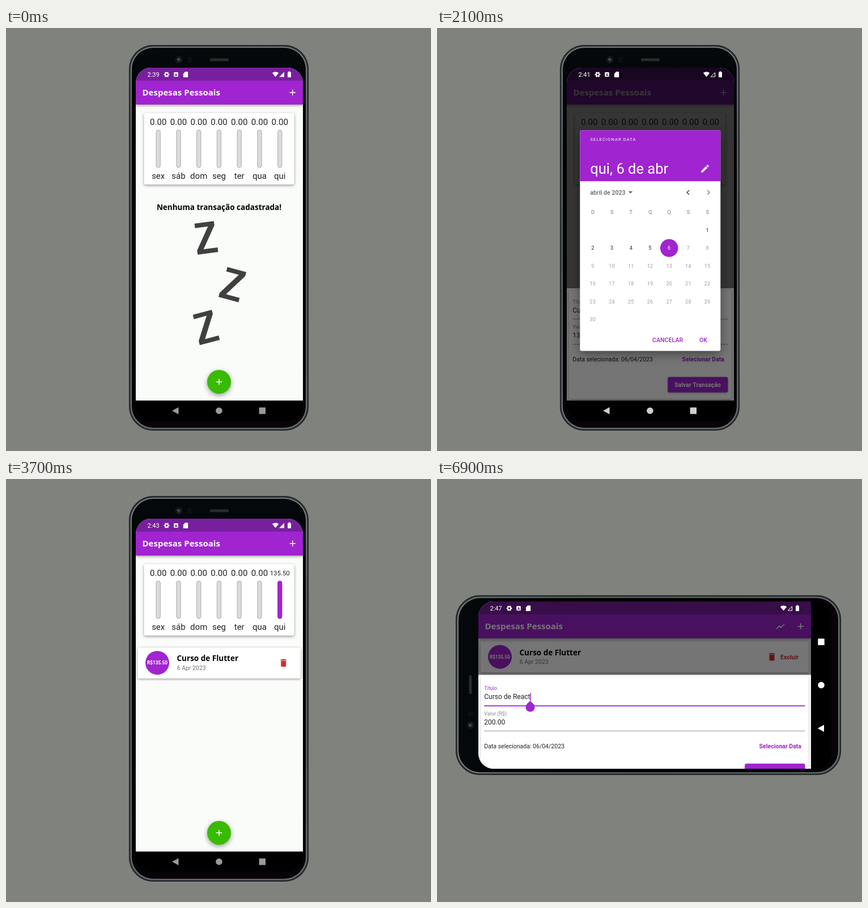
Write an HTML page with a canvas that moves like this. It is 750 by 746 pixels and loops after 8 s.

```html
<!DOCTYPE html>
<html lang="pt">
<head>
<meta charset="utf-8">
<title>Despesas Pessoais</title>
<style>
html, body { margin: 0; width: 100%; height: 100%; overflow: hidden; background: #80827e; }
canvas { display: block; }
</style>
</head>
<body>
<canvas id="stage" width="750" height="746"></canvas>
<script>
const ctx = document.getElementById('stage').getContext('2d');
const LOOP = 8000;
const PURPLE = '#a024d0', WHITE = '#fff', INK = '#222', GREY = '#757575', RED = '#d32f2f';
const roboto = (size, weight = 400) => `${weight} ${size}px Roboto, sans-serif`;
const openSans = size => `700 ${size}px "Open Sans", sans-serif`;
const inter = size => `400 ${size}px Inter, sans-serif`;

const ICONS = {
  add: 'M19 13h-6v6h-2v-6H5v-2h6V5h2v6h6v2z',
  edit: 'M3 17.25V21h3.75L17.81 9.94l-3.75-3.75zM20.71 7.04c.39-.39.39-1.02 0-1.41l-2.34-2.34c-.39-.39-1.02-.39-1.41 0l-1.83 1.83 3.75 3.75z',
  trash: 'M6 19c0 1.1.9 2 2 2h8c1.1 0 2-.9 2-2V7H6zM19 4h-3.5l-1-1h-5l-1 1H5v2h14z',
  chart: 'M3.5 18.49l6-6.01 4 4L22 6.92l-1.41-1.41-7.09 7.97-4-4L2 16.99z',
  prev: 'M15.41 7.41L14 6l-6 6 6 6 1.41-1.41L10.83 12z',
  next: 'M10 6L8.59 7.41 13.17 12l-4.58 4.59L10 18l6-6z',
  drop: 'M7 10l5 5 5-5z',
  check: 'M9 16.17L4.83 12l-1.42 1.41L9 19 21 7l-1.41-1.41z',
  wifi: 'M12 21L0 6Q12-2 24 6z',
  card: 'M3 9L10 1H19Q21 1 21 3V21Q21 23 19 23H5Q3 23 3 21z',
  z: 'M-17-27.5H17.5V-20L-7 19.5H18V27.5H-18.5V20L6-19.5H-17z'
};
for (const name in ICONS) ICONS[name] = new Path2D(ICONS[name]);

// Each slide holds until the next one starts.
const SLIDES = [
  { at: 0, clock: '2:39', signal: true },
  { at: 500, clock: '2:40', signal: true, over: keyboardForm, nav: '#85858a', keys: true },
  { at: 2100, clock: '2:41', over: datePicker, nav: '#cfcfcf' },
  { at: 3700, clock: '2:43', signal: true, paid: true },
  { at: 5300, clock: '2:44', wide: true, paid: true },
  { at: 6900, clock: '2:47', wide: true, paid: true, over: wideForm, nav: WHITE }
];

function text(str, x, y, font, color, align = 'left', spacing = 0) {
  ctx.font = font;
  ctx.fillStyle = color;
  ctx.textAlign = align;
  ctx.letterSpacing = spacing + 'px';
  ctx.fillText(str, x, y);
}

function box(x, y, w, h, color, r = 0, shadow = 0) {
  ctx.save();
  if (shadow) {
    ctx.shadowColor = 'rgba(0,0,0,.4)';
    ctx.shadowBlur = shadow;
    ctx.shadowOffsetY = shadow / 3;
  }
  ctx.fillStyle = color;
  ctx.beginPath();
  ctx.roundRect(x, y, w, h, r);
  ctx.fill();
  ctx.restore();
}

function frame(x, y, w, h, r, color, width) {
  ctx.strokeStyle = color;
  ctx.lineWidth = width;
  ctx.beginPath();
  ctx.roundRect(x, y, w, h, r);
  ctx.stroke();
}

const disc = (x, y, r, color, shadow) => box(x - r, y - r, 2 * r, 2 * r, color, r, shadow);

function path(points, color, width) {
  ctx.beginPath();
  points.forEach(([x, y]) => ctx.lineTo(x, y));
  if (width) {
    ctx.strokeStyle = color;
    ctx.lineWidth = width;
    ctx.stroke();
  } else {
    ctx.fillStyle = color;
    ctx.fill();
  }
}

function icon(name, x, y, color, size = 18) {
  ctx.save();
  ctx.translate(x - size / 2, y - size / 2);
  ctx.scale(size / 24, size / 24);
  ctx.fillStyle = color;
  ctx.fill(ICONS[name]);
  ctx.restore();
}

function fade(...colors) {
  const gradient = ctx.createLinearGradient(0, 30, 0, 710);
  colors.forEach((color, i) => gradient.addColorStop(i / (colors.length - 1), color));
  return gradient;
}

function phone(wide) {
  ctx.save();
  if (wide) {
    ctx.translate(3, 739);
    ctx.rotate(-Math.PI / 2);
  }
  box(217, 30, 317, 680, '#3a3f42', 43);
  frame(217.6, 30.6, 315.8, 678.8, 42.5, '#16191b', 1.2);
  frame(221, 34, 309, 672, 39, fade('#a0a5a7', '#777c7f', '#6c7174', '#777c7f', '#8a8f92'), 1.2);
  box(222, 35, 307, 670, fade('#05090c', '#000', '#000', '#080408'), 38);
  disc(305, 56, 6.5, '#15181b');
  disc(305, 56, 3, '#33373e');
  disc(304, 55, 1, '#777b82');
  box(320, 51, 8, 10, '#0c0f12', 2);
  box(360, 53.5, 33, 5, '#2a2a2a', 1.5);
  ctx.restore();
}

function statusBar(w, { clock, signal }) {
  text(clock, 20.5, 16, roboto(11), WHITE);
  ctx.strokeStyle = WHITE;
  ctx.lineWidth = 2;
  ctx.beginPath();
  ctx.arc(54.5, 12, 2.8, 0, 7);
  ctx.stroke();
  for (let i = 0; i < 6; i++) {
    const a = i * Math.PI / 3, c = Math.cos(a), s = Math.sin(a);
    path([[54.5 + 3 * c, 12 + 3 * s], [54.5 + 4.9 * c, 12 + 4.9 * s]], WHITE, 2.2);
  }
  box(67.2, 8, 7.6, 8, WHITE, 1);
  text('A', 71, 14.6, roboto(7, 700), '#51156c', 'center');
  icon('card', 88, 12, WHITE, 11);
  icon('wifi', w - 48.5, 12, WHITE, 11.5);
  const bars = [[w - 42, 16.5], [w - 33, 16.5], [w - 33, 7.5]];
  if (signal) path(bars, WHITE);
  else path([[w - 40.8, 16], [w - 33.5, 16], [w - 33.5, 8.7], [w - 40.8, 16]], WHITE, 1);
  box(w - 27, 7.7, 6, 9.3, WHITE, 1);
  box(w - 25.5, 6.5, 3, 2, WHITE);
}

function appBar(w, wide) {
  box(0, 22, w, 43, PURPLE, 0, 5);
  box(0, 0, w, 22.7, '#781f9e');
  text('Despesas Pessoais', 11.5, 49.3, openSans(15.02), WHITE);
  icon('add', w - 18.3, 43.8, WHITE);
  if (wide) icon('chart', w - 54, 44, WHITE);
}

function weekChart(paid) {
  box(14.5, 80, 265, 126, WHITE, 3, 5);
  ['sex', 'sáb', 'dom', 'seg', 'ter', 'qua', 'qui'].forEach((day, i) => {
    const x = 39.7 + 35.75 * i, full = paid && i === 6;
    if (full) text('135.50', x, 99.5, roboto(11.4), INK, 'center');
    else text('0.00', x, 101, roboto(15), INK, 'center');
    box(x - 4, 109.5, 8, 67, full ? PURPLE : '#dcdcdc', 4);
    frame(x - 3.6, 110, 7.2, 66, 3.6, full ? PURPLE : '#a0a0a0', .8);
    text(day, x, 196, roboto(15), INK, 'center');
  });
}

function emptyList() {
  text('Nenhuma transação cadastrada!', 147, 250.5, openSans(13.52), '#000', 'center');
  for (const [x, y, deg] of [[124, 300, -7.5], [171, 382.5, 15], [124, 458, -14.5]]) {
    ctx.save();
    ctx.translate(x, y);
    ctx.rotate(deg * Math.PI / 180);
    ctx.fillStyle = '#404040';
    ctx.fill(ICONS.z);
    ctx.restore();
  }
}

function expense(w, y, wide) {
  box(3.5, y, w - 7.5, 54.5, WHITE, 3, 4);
  disc(38, y + 27, 21, PURPLE);
  text('R$135.50', 38, y + 30, roboto(8.2, 700), WHITE, 'center');
  text('Curso de Flutter', 72.5, y + 24, openSans(13.52), '#000');
  text('6 Apr 2023', 72.7, y + 39.5, roboto(10.5), GREY);
  icon('trash', w - (wide ? 69 : 34.3), y + 27, RED);
  if (wide) text('Excluir', w - 22, y + 30.8, roboto(10.5, 700), RED, 'right');
}

function field(w, y, label, value, active) {
  text(label, 10.3, y, roboto(9), active ? PURPLE : '#888');
  text(value, 10.3, y + 16, roboto(12), INK);
  box(10.3, y + 27.3, w - 21, active ? 1.6 : 1.2, active ? PURPLE : '#aaa');
}

function form(w, y, title, value, active) {
  box(0, y, w, 200, WHITE);
  box(3.5, y + 3.5, w - 7.5, 192, WHITE, 3, 3);
  field(w, y + 26.5, 'Título', title, active === 0);
  field(w, y + 71, 'Valor (R$)', value, active === 1);
  text('Data selecionada: 06/04/2023', 10.3, y + 129.3, roboto(10.5), INK);
  text('Selecionar Data', w - 17, y + 129.3, roboto(10.5, 700), PURPLE, 'right');
  box(w - 116.7, y + 156.5, 106, 27, PURPLE, 3, 3);
  text('Salvar Transação', w - 64, y + 173.7, roboto(10.5, 700), WHITE, 'center');
}

const dim = (w, h) => box(0, 0, w, h, 'rgba(0,0,0,.54)');

function keyboardForm(w, h) {
  dim(w, h);
  form(w, 256.6, 'Curso de Flutter', '135,50', 1);
  box(46.5, 333, 1.5, 14, PURPLE);
  box(0, 431.5, w, 192, '#f1eef4');
  const tints = ['#e0deff', '#e0deff', '#f5d9fd', '#a9c7f8'];
  ['123', '456', '789', ',0.'].forEach((row, r) => {
    const y = 438 + 37.35 * r;
    for (let c = 0; c < 4; c++) {
      const x = 3 + 73 * c;
      box(x, y, 69.5, 33, c < 3 ? WHITE : tints[r], 16.5);
      if (c < 3) text(row[c], x + 34.7, y + 25.3, inter(22), INK, 'center');
    }
  });
  path([[252, 457], [262, 457]], INK, 1.5);
  path([[249, 490], [249, 493.5], [264.5, 493.5], [264.5, 490]], INK, 1.5);
  path([[248, 529.5], [252.5, 523], [265, 523], [265, 536], [252.5, 536], [248, 529.5], [252.5, 523]], INK, 1.5);
  path([[255, 526.5], [261, 532.5]], INK, 1.5);
  path([[261, 526.5], [255, 532.5]], INK, 1.5);
  icon('check', 257, 566.5, INK, 17);
}

function datePicker(w, h) {
  dim(w, h);
  form(w, 389, 'Curso de Flutter', '135,50');
  dim(w, h);
  box(23.3, 110.2, 248, 389.4, WHITE, 3, 18);
  box(23.3, 110.2, 248, 90.1, PURPLE, [3, 3, 0, 0]);
  text('SELECIONAR DATA', 41.4, 128.8, roboto(7.5), WHITE, 'left', 1.13);
  text('qui, 6 de abr', 41.3, 187, roboto(25.5), WHITE);
  icon('edit', 244, 178, WHITE);
  text('abril de 2023', 41.2, 223.8, roboto(10.5, 500), '#616161', 'left', .08);
  icon('drop', 112.5, 219.5, '#616161');
  icon('prev', 214, 220, '#444');
  icon('next', 250, 220, '#888');
  const col = i => 45.9 + 33.7 * i;
  [...'DSTQQSS'].forEach((d, i) => text(d, col(i), 258.2, roboto(9), GREY, 'center'));
  for (let day = 1; day <= 30; day++) {
    const x = col((day + 5) % 7), y = 286.5 + 31.55 * Math.floor((day + 5) / 7);
    if (day === 6) disc(x, y, 15.8, PURPLE);
    text(day, x, y + 3.2, roboto(9), day < 6 ? INK : day === 6 ? WHITE : '#9e9e9e', 'center', .25);
  }
  text('CANCELAR', 151, 483.7, roboto(10.5, 500), PURPLE, 'left', .1);
  text('OK', 234, 483.7, roboto(10.5, 500), PURPLE, 'left', .1);
}

function wideForm(w, h) {
  dim(w, h);
  form(w, 129.5, 'Curso de React', '200.00', 0);
  box(91.3, 161, 1.5, 14, PURPLE);
  disc(91.5, 186.5, 8, PURPLE);
  path([[91.5, 175], [85.8, 181], [97.2, 181]], PURPLE);
}

function navBar(wide, color, keys) {
  const [back, home, recent] = [0, 1, 2].map(i => wide ? [605, 223.7 - 76.2 * i] : [70.5 + 76.4 * i, 605]);
  const [x, y] = back;
  if (keys) path([[x - 5.7, y - 6], [x + 6.7, y - 6], [x + .5, y + 5]], color);
  else path([[x - 6.3, y], [x + 5, y - 6.3], [x + 5, y + 6.3]], color);
  disc(...home, 5.8, color);
  box(recent[0] - 5.7, recent[1] - 5.7, 11.4, 11.4, color, .5);
  if (!keys) return;
  for (let i = 0; i < 10; i++) box(255.5 + i % 5 * 2.5, 601.5 + (i > 4) * 2.5, 1.4, 1.4, color);
  box(258, 606.7, 6, 1.4, color);
}

function draw(slide) {
  const { wide, paid, over, nav, keys } = slide;
  const [w, h] = wide ? [587, 295] : [295, 587];
  box(0, 0, 750, 746, '#80827e');
  phone(wide);
  ctx.save();
  ctx.translate(wide ? 73 : 229, wide ? 216 : 70);
  ctx.beginPath();
  ctx.roundRect(0, 0, wide ? 623 : w, wide ? h : 623, 27);
  ctx.clip();
  box(0, 0, 624, 624, '#000');
  ctx.save();
  ctx.beginPath();
  ctx.rect(0, 0, w, keys ? 623 : h);
  ctx.clip();
  box(0, 0, w, h, '#fafcf9');
  if (!wide) weekChart(paid);
  if (paid) expense(w, wide ? 70.7 : 227.2, wide);
  else emptyList();
  appBar(w, wide);
  disc(w / 2 - .5, h - 33, 21, '#38bb00', 8);
  icon('add', w / 2 - .5, h - 33, WHITE);
  if (over) over(w, h);
  statusBar(w, slide);
  ctx.restore();
  navBar(wide, nav || '#9a9a9a', keys);
  ctx.restore();
}

function tick() {
  const t = performance.now() % LOOP;
  draw(SLIDES.findLast(slide => slide.at <= t));
  requestAnimationFrame(tick);
}
tick();
</script>
</body>
</html>
```
